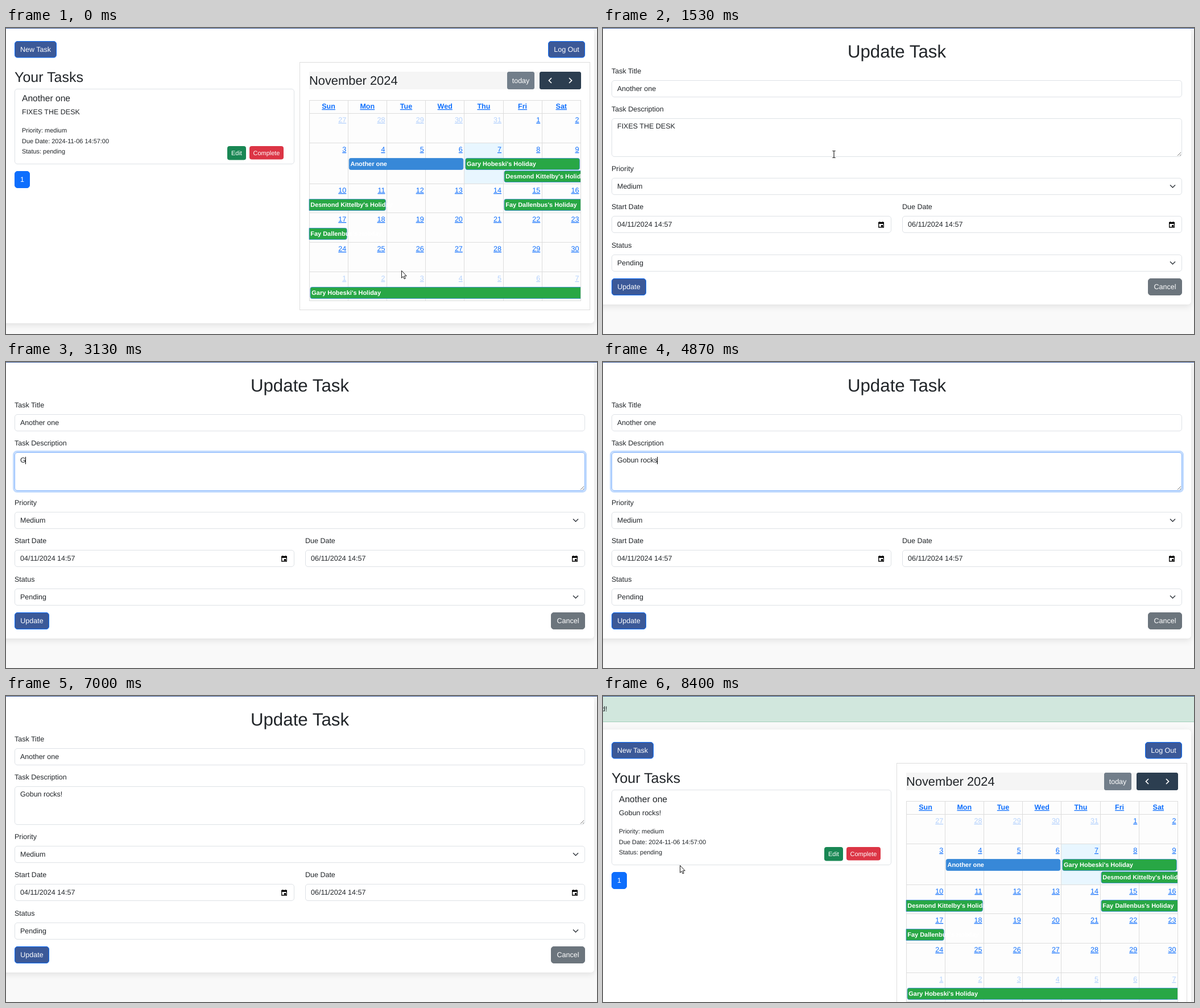
Write an HTML page that moves like this. It is 1039x539 px and loops after 9.4 s.

```html
<!DOCTYPE html>
<html lang="en">
<head>
<meta charset="utf-8">
<title>Task planner</title>
<style>
html, body { margin: 0; width: 100%; height: 100%; overflow: hidden; background: #f9f9f9; }
svg { display: block; width: 100%; height: 100%; }
text { font-family: "Liberation Sans", Arial, sans-serif; white-space: pre; text-rendering: geometricPrecision; }
.panel { fill: #fff; filter: drop-shadow(0 3px 6px rgba(0, 0, 0, .1)); }
.link { text-decoration: underline; }
</style>
</head>
<body>
<svg id="stage"></svg>
<script>
const INK = '#212529', LINE = '#dee2e6', GRID = '#ddd', NAVY = '#3b5998', BLUE = '#0d6efd';
const OLD_TEXT = 'FIXES THE DESK', NEW_TEXT = 'Gobun rocks!';
const EM = 12.5, SMALL = 10.94;

// Text whose line is centred on cy
const text = (x, cy, str, size = EM, fill = INK, extra = '') =>
  `<text x="${x}" y="${Math.round(cy + size * .3465)}" font-size="${size}" fill="${fill}" ${extra}>${str}</text>`;

const rect = (x, y, w, h, fill, extra = '') =>
  `<rect x="${x}" y="${y}" width="${w}" height="${h}" fill="${fill}" ${extra}/>`;

const box = (x, y, w, h, fill = '#fff', stroke = LINE, r = 4.5, extra = '') =>
  rect(x + .5, y + .5, w - 1, h - 1, fill, `stroke="${stroke}" rx="${r}" ${extra}`);

const line = (d, stroke = GRID, width = 1, extra = '') =>
  `<path d="${d}" fill="none" stroke="${stroke}" stroke-width="${width}" ${extra}/>`;

const button = (x, y, w, h, label, fill, stroke = fill, size = EM, r = 4.5, id = '') =>
  box(x, y, w, h, fill, stroke, r, id && `id="${id}"`) +
  text(x + w / 2, y + h / 2, label, size, '#fff', 'text-anchor="middle"');

// ---- Calendar ----
const ROWS = [150, 202, 274, 325.5, 377.5, 429.5, 480];
const colX = c => 533 + c * 68.2;
const snap = v => Math.floor(v) + .5;

function event(row, slot, from, to, label, opts = '') {
  const x = colX(from) + (opts.includes('<') ? 0 : 2), end = colX(to) - (opts.includes('>') ? 0 : 2);
  const y = Math.floor(ROWS[row]) + 27.5 + slot * 22, h = 20;
  const l = opts.includes('<') ? 0 : 3, r = opts.includes('>') ? 0 : 3;
  const fill = opts.includes('task') ? '#3788d8' : '#28a745';
  const d = `M${x + l} ${y}H${end - r}q${r} 0 ${r} ${r}v${h - 2 * r}q0 ${r} ${-r} ${r}` +
    `H${x + l}q${-l} 0 ${-l} ${-l}v${2 * l - h}q0 ${-l} ${l} ${-l}z`;
  return `<path d="${d}" fill="${fill}" stroke="#3788d8" stroke-width=".8"/>` +
    text(x + 2.3, y + 10, label, SMALL, '#fff', 'font-weight="bold"');
}

function calendar() {
  let s = box(516, 60, 511, 437, '#fff', GRID, 0) + rect(533, 77, 478, 31, '#f5f5f5') +
    text(533, 92, 'November 2024', EM * 1.75) +
    button(881, 77, 48, 31, 'today', '#727e8a', '#727e8a', EM, 2.5) +
    box(938, 77, 73, 31, '#2c3e50', '#2c3e50', 2.5) +
    line('M959 88l-4.5 4.5 4.5 4.5M990 88l4.5 4.5-4.5 4.5', '#fff', 1.7) +
    rect(533, 127, 478, 353, '#fdfdfd') + rect(colX(4), 202, 68, 72, '#e8f6ff');
  for (let c = 0; c < 8; c++) s += line(`M${snap(colX(c))} 127V480`);
  for (const y of [127, ...ROWS]) s += line(`M533 ${snap(y)}H1011`);
  ['Sun', 'Mon', 'Tue', 'Wed', 'Thu', 'Fri', 'Sat'].forEach((d, c) =>
    s += text(colX(c + .5), 138, d, EM, BLUE, 'class="link" font-weight="bold" text-anchor="middle"'));
  for (let i = 0; i < 42; i++) {
    const day = i < 5 ? 27 + i : (i - 5) % 30 + 1, other = i < 5 || i > 34;
    s += text(colX(i % 7 + 1) - 3, Math.floor(ROWS[i / 7 | 0]) + 12, day, EM, BLUE,
      `class="link" text-anchor="end" ${other ? 'opacity=".3"' : ''}`);
  }
  const gary = "Gary Hobeski's Holiday", des = "Desmond Kittelby's Holiday", fay = "Fay Dallenbus's Holiday";
  return s + event(1, 0, 1, 4, 'Another one', 'task') + event(1, 0, 4, 7, gary) +
    event(1, 1, 5, 7, des, '>') + event(2, 0, 0, 2, des, '<') + event(2, 0, 5, 7, fay, '>') +
    event(3, 0, 0, 1, fay, '<') + event(5, 0, 0, 7, gary, '>') + line('M1010.5 127V480');
}

const dashboard = () =>
  rect(-30, 1, 1064, 519, '#fff', 'rx="6" class="panel"') +
  button(15, 23, 74, 29.5, 'New Task', NAVY, BLUE) + button(953, 23, 65, 29.5, 'Log Out', NAVY, BLUE) +
  text(15, 86, 'Your Tasks', EM * 2) + box(15, 107, 492, 133) +
  text(28, 124, 'Another one', EM * 1.25) + text(28, 148, '', EM, INK, 'id="desc"') +
  ['Priority: medium', 'Due Date: 2024-11-06 14:57:00', 'Status: pending']
    .map((s, i) => text(28, 180 + i * 18.75, s, SMALL)).join('') +
  button(389, 208, 33, 24.5, 'Edit', '#198754', '#198754', SMALL, 3, 'edit') +
  button(428, 208, 60, 23.5, 'Complete', '#dc3545', '#dc3545', SMALL, 3) +
  button(15, 252, 27, 30, '1', BLUE) + calendar();

// ---- Form ----
const field = (x, y, w, label, value) =>
  text(x, y - 16.5, label) + box(x, y, w, 30) + text(x + 10, y + 14.5, value);
const select = (y, label, value) => field(15, y, 1003, label, value) +
  line(`M997 ${y + 12.5}l4.5 4.5 4.5-4.5`, '#343a40', 1.5);
const date = (x, label, value) => field(x, 331, 492, label, value) +
  line(`M${x + 469.7} 342.5h8.6v8.5h-8.6zM${x + 471.5} 341v2M${x + 476.5} 341v2`, '#000', 1.3) +
  rect(x + 469, 342, 10, 3, '#000') + rect(x + 474, 347, 3, 3, '#000');

const form = () =>
  rect(-30, 1, 1064, 486, '#fff', 'rx="6" class="panel"') +
  text(516.5, 41, 'Update Task', EM * 2.5, INK, 'text-anchor="middle"') +
  field(15, 92, 1003, 'Task Title', 'Another one') +
  text(15, 142.5, 'Task Description') + box(15, 159, 1003, 68) +
  `<g id="focus">${rect(13.5, 157.5, 1006, 71, 'none', 'rx="6" stroke="#c2dbfe" stroke-width="3"')}` +
  `${box(15, 159, 1003, 68, 'none', '#86b7fe')}</g>` +
  line('M1010 225l6-6M1014 225l2-2', '#777') + text(25, 173, '', EM, INK, 'id="area"') +
  `<clipPath id="clip">${rect(25, 164, 102, 19, '#000', 'id="range"')}</clipPath>` +
  `<g id="selection" clip-path="url(#clip)">${rect(25, 164, 102, 19, '#0078d7')}${text(25, 173, OLD_TEXT, EM, '#fff')}</g>` +
  rect(0, 167, 1, 13, '#000', 'id="caret"') +
  select(264, 'Priority', 'Medium') +
  date(15, 'Start Date', '04/11/2024 14:57') + date(526, 'Due Date', '06/11/2024 14:57') +
  select(399, 'Status', 'Pending') +
  button(15, 441, 61, 30, 'Update', NAVY, BLUE, EM, 4.5, 'update') +
  button(958, 441, 60, 30, 'Cancel', '#6c757d');

const CURSORS = {
  arrow: '<path d="M.5 .5V13.3L3.3 10.6 5.2 15 7.2 14.1 5.3 9.8H9.2z" fill="#fff" stroke="#000" stroke-width=".9"/>',
  hand: '<path d="M-1.3 1.2Q0-.6 1.3 1.2V5.2Q2.6 4 3.7 5.6 5 4.6 6 6.2 7.4 5.6 8 7.4V11Q8 13 7 14.5V16.5H-.3V14.7L-3.6 10Q-4.2 8.2-2.8 8L-1.3 9.5z" fill="#fff" stroke="#000" stroke-width=".9"/>',
  beam: line('M-2.5-5.5H-.7L0-5 .7-5.5H2.5M-2.5 6.5H-.7L0 6 .7 6.5H2.5M0-5V6', '#000')
};

document.getElementById('stage').innerHTML =
  `<g id="board">${dashboard()}</g><g id="form">${form()}</g>` +
  `<g id="alert">${rect(0, 1, 1039, 45, '#d1e7dd')}${rect(0, 45, 1039, 1, '#a3cfbb')}` +
  `${text(7.5, 23, 'd!', EM, INK, 'text-anchor="end"')}</g>` + rect(0, 0, 1039, 1, NAVY) +
  `<g id="cursor">${Object.entries(CURSORS).map(([k, s]) => `<g id="${k}">${s}</g>`).join('')}</g>`;

// ---- Timeline ----
const LOOP = 9400, TICK = 200 / 3;
const KEYS = [3130, 3600, 3730, 3870, 3930, 4070, 4200, 4330, 4600, 4730, 4870, 5070];
const PATH = [
  [0, 693, 427], [70, 721, 430], [530, 396, 217], [780, 396, 217], [800, 406, 222],
  [1600, 406, 222], [1930, 184, 164], [2070, 184, 168], [2470, 29, 173],
  [5800, 29, 173], [6000, 8, 290], [6270, 52, 448],
  [7600, 42, 348], [7670, 42, 348], [7930, 76, 210], [8130, 118, 206], [8400, 135, 298], [LOOP, 135, 298]
];
const el = id => document.getElementById(id);
const show = (id, on) => el(id).setAttribute('visibility', on ? 'inherit' : 'hidden');
const ramp = (t, a, b) => Math.min(1, Math.max(0, (t - a) / (b - a)));
const within = (t, a, b) => t >= a && t < b;
const paint = (id, fill, stroke) => { el(id).setAttribute('fill', fill); el(id).setAttribute('stroke', stroke); };

function pointer(t) {
  const i = PATH.findIndex(p => p[0] > t), [t0, x0, y0] = PATH[i - 1], [t1, x1, y1] = PATH[i];
  const k = ramp(t, t0, t1);
  return [x0 + (x1 - x0) * k, y0 + (y1 - y0) * k].map(Math.round);
}

function mix(a, b, k) {
  return `rgb(${a.map((v, i) => Math.round(v + (b[i] - v) * k))})`;
}

function render(now) {
  const t = Math.floor((now % LOOP + 4) / TICK) * TICK + 4;
  const onForm = within(t, 1470, 7130), saved = t >= 7130;
  const [x, y] = pointer(t);

  show('board', !onForm);
  show('form', onForm);
  show('alert', saved);
  el('board').setAttribute('transform', `translate(0 ${saved ? 58 : 0})`);
  el('desc').textContent = saved ? NEW_TEXT : OLD_TEXT;

  const editHover = within(t, 530, 1470) ? '#157347' : '#198754';
  paint('edit', editHover, editHover);

  const typed = KEYS.filter(k => k <= t).length;
  el('area').textContent = typed ? NEW_TEXT.slice(0, typed) : OLD_TEXT;
  el('focus').setAttribute('opacity', ramp(t, 2070, 2270) * (1 - ramp(t, 6470, 6670)));

  const left = Math.min(127, Math.max(25, x < 32 ? 25 : x));
  el('range').setAttribute('x', left);
  el('range').setAttribute('width', 127 - left);
  show('selection', onForm && within(t, 2130, 3130));

  const caretOn = within(t, 3130, 6530) && !within(t, 5600, 6130);
  show('caret', caretOn);
  if (caretOn) el('caret').setAttribute('x', Math.floor(25 + el('area').getComputedTextLength()));

  const hover = ramp(t, 6130, 6270) * (1 - ramp(t, 6800, 7000));
  paint('update', mix([59, 89, 152], [11, 94, 215], hover), mix([13, 110, 253], [10, 88, 202], hover));

  show('cursor', t < 3130 || within(t, 5870, 6870) || t >= 7670);
  el('cursor').setAttribute('transform', `translate(${x} ${y})`);
  const kind = onForm ? (y > 440 ? 'hand' : x < 15 ? 'arrow' : 'beam') : within(t, 530, 1470) ? 'hand' : 'arrow';
  for (const k in CURSORS) show(k, k === kind);
}

const start = performance.now();
(function frame() {
  render(performance.now() - start);
  requestAnimationFrame(frame);
})();
</script>
</body>
</html>
```
